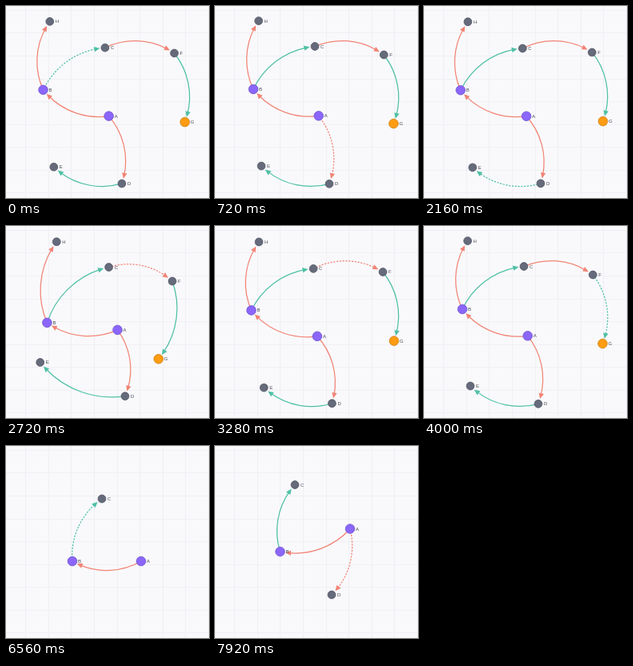
These frames come from a looping animation (254 px wide and 240 px high, 8000 ms). An HTML page with a canvas:

```html
<!DOCTYPE html>
<html lang="en">
<head>
<meta charset="utf-8">
<title>Directed graph</title>
<style>
  html, body { margin: 0; width: 100%; height: 100%; overflow: hidden; background: #f9f9fc; }
  canvas { display: block; width: 254px; height: 240px; }
</style>
</head>
<body>
<canvas id="stage"></canvas>
<script>
const W = 254, H = 240, LOOP = 8000, STEP = 80;
const RED = '#f28474', GREEN = '#4fc0a5';
const canvas = document.getElementById('stage');
const ctx = canvas.getContext('2d');
const ratio = window.devicePixelRatio || 1;
canvas.width = W * ratio;
canvas.height = H * ratio;

const edges = [
  ['AB', RED], ['BC', GREEN], ['AD', RED], ['DE', GREEN],
  ['CF', RED], ['FG', GREEN], ['BH', RED]
];

// Each layout bursts from `start` to `rest` (bending by `via`), then creeps towards `late`.
const pair = {
  settle: 480,
  start: { A: [155, 101], B: [92, 135] },
  rest: { A: [161, 98], B: [86, 138] }
};
const trio = {
  settle: 800,
  start: { A: [169, 144], B: [83, 144], C: [120, 66] },
  rest: { A: [168, 143.3], B: [83.8, 143.5], C: [120.2, 67] }
};
const quad = {
  settle: 240,
  start: { A: [160, 108], B: [64, 141], C: [117, 51], D: [151, 190] },
  rest: { A: [169, 103.5], B: [81.5, 132], C: [100, 48.5], D: [146, 186] }
};
const full = {
  settle: 320,
  start: {
    A: [169, 107.5], B: [78.5, 158], C: [139.5, 54.5], D: [167, 184],
    E: [54, 87.5], F: [198.5, 93], G: [81.5, 196], H: [101.5, 40]
  },
  via: { B: [52, 140], E: [18, 140], G: [160, 190], H: [70, 18] },
  rest: {
    A: [129.7, 137.3], B: [48, 104], C: [125, 50.5], D: [143, 222.3],
    E: [58, 200], F: [211.3, 61], G: [223.5, 147], H: [54.6, 18.6]
  },
  late: {
    A: [127.8, 137.8], B: [45.3, 105.5], C: [123, 53.5], D: [146.6, 221.7],
    E: [61.4, 202.2], F: [210, 57.3], G: [224, 143.4], H: [55, 20]
  }
};

const phases = [
  { at: -500, layout: full, active: 'BC' },
  { at: 400, layout: full, active: 'AD' },
  { at: 1520, layout: full, active: 'DE' },
  { at: 2560, layout: full, active: 'CF' },
  { at: 3680, layout: full, active: 'FG' },
  { at: 4880 },
  { at: 5440, layout: pair, active: 'AB' },
  { at: 6560, layout: trio, active: 'BC' },
  { at: 7680, layout: quad, active: 'AD' }
];

function position(layout, name, age) {
  const { settle, start, via, rest, late } = layout;
  const u = 1 - (1 - Math.min(1, age / settle)) ** 2;
  const creep = late ? 1.5 * (1 - Math.exp(-Math.max(0, age - settle) / 400)) : 0;
  return [0, 1].map(i => {
    const a = start[name][i], c = rest[name][i];
    const b = via && via[name] ? via[name][i] : (a + c) / 2;
    const p = (1 - u) ** 2 * a + 2 * u * (1 - u) * b + u * u * c;
    return creep ? p + creep * (late[name][i] - c) : p;
  });
}

function drawGrid() {
  ctx.fillStyle = '#f9f9fc';
  ctx.fillRect(0, 0, W, H);
  ctx.fillStyle = '#f0f0f4';
  const gap = 28.57;
  for (let x = 24.3; x < W; x += gap) ctx.fillRect(Math.round(x), 0, 1, H);
  for (let y = 4.8; y < H; y += gap) ctx.fillRect(0, Math.round(y), W, 1);
}

// A 60 degree arc: its radius equals the distance between the two nodes.
function drawEdge([x1, y1], [x2, y2], color, dashed) {
  const dx = x2 - x1, dy = y2 - y1, r = Math.hypot(dx, dy);
  const h = Math.sqrt(3) / 2;
  const cx = (x1 + x2) / 2 - dy * h, cy = (y1 + y2) / 2 + dx * h;
  const from = Math.atan2(y1 - cy, x1 - cx), to = from + Math.PI / 3;
  const tip = to - 6.6 / r, base = tip - 7 / r;
  const at = (angle, radius) => [cx + radius * Math.cos(angle), cy + radius * Math.sin(angle)];

  ctx.strokeStyle = ctx.fillStyle = color;
  ctx.lineWidth = 1.25;
  ctx.setLineDash(dashed ? [2.2, 1.6] : []);
  ctx.beginPath();
  ctx.arc(cx, cy, r, from, tip - 3 / r);
  ctx.stroke();
  ctx.setLineDash([]);

  ctx.beginPath();
  ctx.moveTo(...at(tip, r));
  ctx.lineTo(...at(base, r + 3.2));
  ctx.lineTo(...at(base, r - 3.2));
  ctx.fill();
}

function drawNode(name, [x, y]) {
  const [fill, stroke, radius] =
    name < 'C' ? ['#8b66fa', '#6f52c8', 5.8] :
    name === 'G' ? ['#ff9c12', '#cc7d0e', 5.8] : ['#666b7b', '#515562', 4.9];
  ctx.beginPath();
  ctx.arc(x, y, radius, 0, Math.PI * 2);
  ctx.fillStyle = fill;
  ctx.fill();
  ctx.strokeStyle = stroke;
  ctx.lineWidth = 0.8;
  ctx.stroke();
}

function draw(time) {
  ctx.setTransform(ratio, 0, 0, ratio, 0, 0);
  drawGrid();
  const { at, layout, active } = phases.filter(p => p.at <= time).pop();
  if (!layout) return;

  const names = Object.keys(layout.rest);
  const places = {};
  for (const name of names) places[name] = position(layout, name, time - at);

  for (const [[a, b], color] of edges) {
    if (places[a] && places[b]) drawEdge(places[a], places[b], color, a + b === active);
  }
  for (const name of names) drawNode(name, places[name]);

  ctx.font = '6px "Liberation Sans", Arial, sans-serif';
  ctx.fillStyle = '#454852';
  for (const name of names) ctx.fillText(name, places[name][0] + 7, places[name][1] + 2);
}

const began = performance.now();
function frame() {
  const time = (performance.now() - began) % LOOP;
  draw(Math.floor(time / STEP) * STEP);
  requestAnimationFrame(frame);
}
frame();
</script>
</body>
</html>
```
